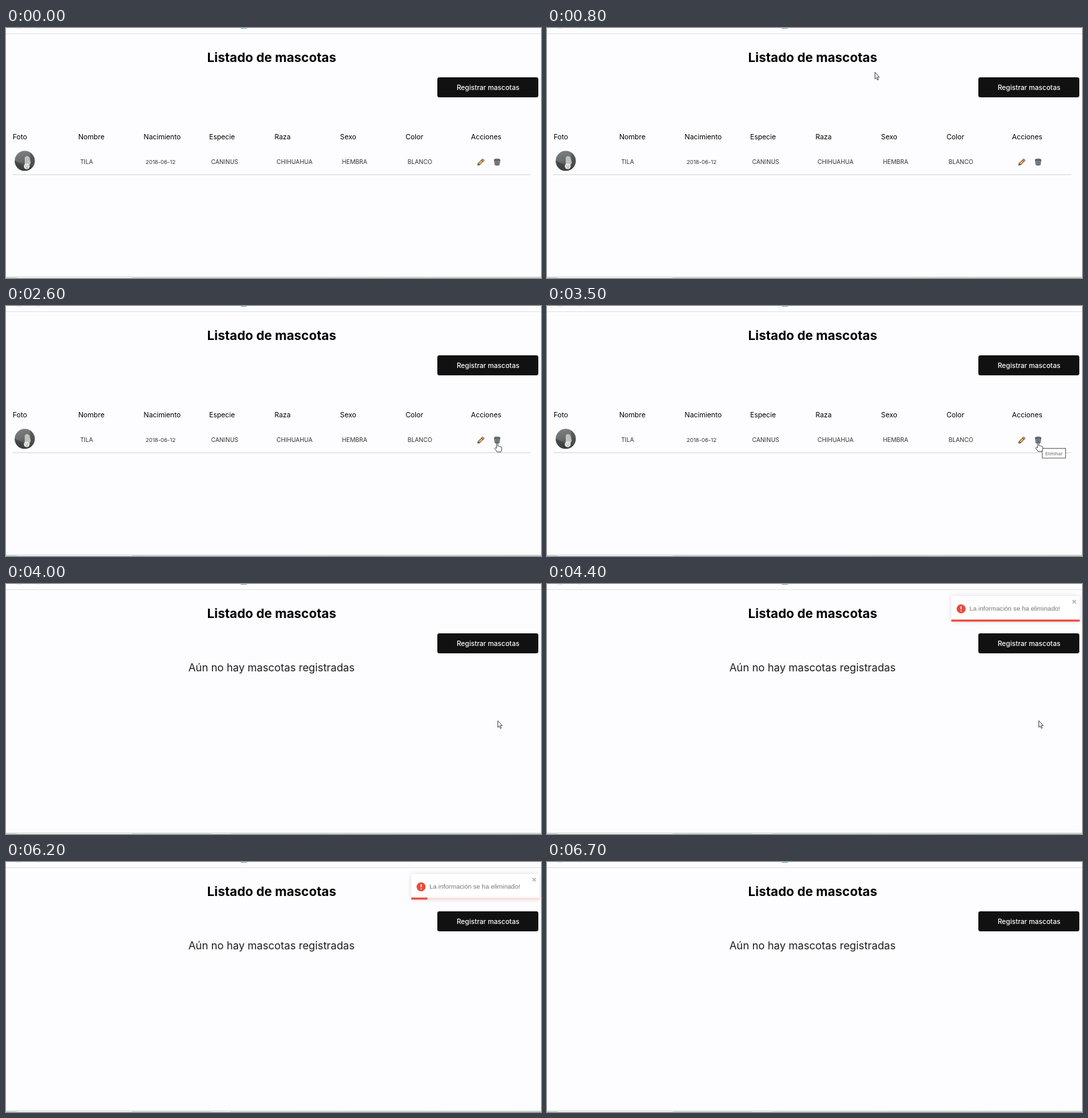
Animation of 800x375 px, one loop 7.1 s. Source, as an HTML page:

```html
<!DOCTYPE html>
<html lang="es">
<head>
<meta charset="utf-8">
<title>Listado de mascotas</title>
<style>
html, body { margin: 0; width: 100%; height: 100%; overflow: hidden; background: #fdfdff; }
svg { display: block; width: 100vw; height: 100vh; }
text { font-family: Inter, "Open Sans", sans-serif; fill: #000; }
.title { font-size: 19.2px; font-weight: 700; text-anchor: middle; }
.button { font-size: 10.2px; font-weight: 500; fill: #fff; text-anchor: middle; }
.head { font-size: 10.4px; font-weight: 400; }
.cell { font-size: 8.9px; fill: #333; }
.date { font-size: 8.2px; }
.empty { font-size: 15.8px; fill: #1c1c1c; text-anchor: middle; }
.message { font: 9.6px "Liberation Sans", Arial, sans-serif; fill: #757575; }
.tip { font: 6.9px "Open Sans", sans-serif; fill: #575757; }
.toast { filter: drop-shadow(0 .6px 3px rgba(0, 0, 0, .13)); }
.pointer { fill: #fff; stroke: #222; stroke-width: .8; stroke-linejoin: round; }
</style>
</head>
<body>
<svg viewBox="0 0 800 375">
  <defs>
    <clipPath id="avatar"><circle cx="28" cy="199.3" r="15"/></clipPath>
    <linearGradient id="photo" x1=".35" x2=".6" y2="1">
      <stop stop-color="#7c7f7f"/><stop offset=".45" stop-color="#6a6d6d"/><stop offset="1" stop-color="#2f3133"/>
    </linearGradient>
    <linearGradient id="strip">
      <stop stop-color="#c9e2d9"/><stop offset=".5" stop-color="#d5e4dc"/><stop offset="1" stop-color="#c8d6c4"/>
    </linearGradient>
  </defs>
  <rect width="800" height="375" fill="#fdfdff"/>

  <path d="M0 8.5H800" stroke="#dfe3e8"/>
  <path d="M351 .4H360" stroke="#69aee0" stroke-width="1.2"/>
  <path d="M16 .2H23M47 .2H50" stroke="#c9dcea" stroke-width=".8"/>
  <rect y="373" width="800" height="2" fill="url(#strip)"/>
  <path d="M0 373.5H800" stroke="#cdd4d0"/>
  <rect x="16" y="374" width="172" height="1" fill="#fff"/>
  <rect id="gap" x="307" y="374" width="29" height="1" fill="#f5f8f6"/>

  <text class="title" x="397.2" y="51.3">Listado de mascotas</text>
  <rect x="645" y="74" width="151" height="30" rx="3" fill="#111"/>
  <text class="button" x="720.8" y="92.7">Registrar mascotas</text>

  <g id="list">
    <g id="columns"></g>
    <g clip-path="url(#avatar)">
      <rect x="13" y="184" width="30" height="31" fill="url(#photo)"/>
      <path d="M13 199L27 206 26 215H13Z" fill="#3a3c3e" opacity=".7"/>
      <path d="M36 184L43 192V212L37 206Z" fill="#4a4d4e" opacity=".7"/>
      <path d="M28 194Q31 190 35 194L37 202Q36 206 33 207L28 205Z" fill="#bfc0bc"/>
      <ellipse cx="31" cy="207.5" rx="4.4" ry="4.2" fill="#e6e4df"/>
      <path d="M29.4 207H30.2M32.4 207H33.2M30.8 209.4H32" stroke="#4a4542"/>
    </g>
    <path d="M10 220H784" stroke="#d2d2d6"/>
    <g transform="translate(705.3 206) rotate(-45)" stroke="#3b3026" stroke-width=".8" stroke-linejoin="round">
      <path d="M.4 0L3-1.6H9.5V1.6H3Z" fill="#f6b44a"/>
      <path d="M.4 0L3-1.6V1.6Z" fill="#f1d6ad"/>
      <path d="M9.5-1.6H12.2V1.6H9.5Z" fill="#e8a092"/>
    </g>
    <g stroke="#33383c" stroke-width=".7">
      <path d="M730.2 198.2H738.6L737.6 205.3Q734.4 206.8 731.2 205.3Z" fill="#939ba1"/>
      <ellipse cx="734.4" cy="197.8" rx="4.5" ry="1.4" fill="#6b757c"/>
      <path d="M732.6 200.2L733 205M734.4 200.2V205.3M736.2 200.2L735.8 205" fill="none" stroke-width=".6"/>
    </g>
  </g>
  <text id="empty" class="empty" x="397" y="130.6">Aún no hay mascotas registradas</text>

  <g id="toast">
    <rect class="toast" x="606" y="18" width="192" height="38.4" rx="2.4" fill="#fff"/>
    <circle cx="620.7" cy="37.2" r="6.7" fill="#e74c3c"/>
    <path d="M620.7 33.4V37.9" stroke="#fff" stroke-width="1.6"/>
    <circle cx="620.7" cy="40.3" r=".9" fill="#fff"/>
    <text class="message" x="633.2" y="40.4">La información se ha eliminado!</text>
    <path d="M787.2 24L792.4 29.2M792.4 24L787.2 29.2" stroke="#a0a0a0" stroke-width="1.1"/>
    <rect x="606" y="53.4" width="192" height="3" rx="1" fill="#e74c3c" opacity=".18"/>
    <rect id="bar" x="606" y="53.4" width="192" height="3" fill="#e74c3c"/>
  </g>

  <g id="tip">
    <rect x="740.5" y="213.5" width="35" height="14.6" fill="#fff" stroke="#666"/>
    <text class="tip" x="744.9" y="223.6">Eliminar</text>
  </g>
  <path id="arrow" class="pointer" d="M.4 .4V10.4L2.6 8.4 4.1 12 5.6 11.4 4.1 7.8H7Z"/>
  <path id="hand" class="pointer" d="M-1.6 8V1.2Q-1.6 .2-.6 .2T.5 1.2V4.8Q1.6 4.1 2.4 5.1 3.6 4.6 4.2 5.6 6 5.2 6.2 7V9.4Q6.2 11.2 5 13.4H-.8Q-1.8 11.2-4 8.9-4.6 7.7-3.4 7.2-2.4 7.2-1.6 8Z"/>
</svg>
<script>
const LOOP = 7100, STEP = 100, DELETED = 3900;
const byId = id => document.getElementById(id);

const columns = [
  ["Foto"], ["Nombre", "TILA"], ["Nacimiento", "2018-06-12"], ["Especie", "CANINUS"],
  ["Raza", "CHIHUAHUA"], ["Sexo", "HEMBRA"], ["Color", "BLANCO"], ["Acciones"]
];

function addText(x, y, cls, value) {
  const el = document.createElementNS("http://www.w3.org/2000/svg", "text");
  el.setAttribute("x", x);
  el.setAttribute("y", y);
  el.setAttribute("class", cls);
  el.textContent = value;
  byId("columns").append(el);
}

columns.forEach(([head, value], i) => {
  const x = 10 + i * 97.9;
  addText(x, 167.2, "head", head);
  if (value) addText(x + 3, 204.2, i === 2 ? "cell date" : "cell", value);
});

// Pointer path: time, x, y
const path = [
  [0, 390, -30], [100, 405, -12], [400, 462, 38], [800, 490, 66],
  [1000, 508, 78], [1400, 656, 177], [1600, 599, 161], [1700, 679, 193],
  [1900, 701, 202], [2100, 724, 207], [2300, 735, 206], [2500, 735, 206],
  [2600, 735, 205.5], [2800, 735, 205.5], [2900, 735, 205], [4600, 735, 204.5],
  [4800, 716, 196], [5100, 664, 164], [5300, 643, 151], [5400, 637, 150],
  [5700, 545, 112], [6100, 327, 28], [6200, 290, -20]
];

// Toast entrance: progress, offset
const bounce = [[0, 1800], [.6, -15], [.75, 6], [.9, -3], [1, 0]];

const clamp = v => Math.min(1, Math.max(0, v));
const linear = p => p;
const easeOut = p => 1 - (1 - p) ** 2.2;

function sample(keys, t, ease = linear, col = 1) {
  const i = keys.findIndex(k => k[0] > t);
  if (i < 0) return keys[keys.length - 1][col];
  if (i === 0) return keys[0][col];
  const a = keys[i - 1], b = keys[i];
  return a[col] + (b[col] - a[col]) * ease((t - a[0]) / (b[0] - a[0]));
}

function show(id, on) {
  byId(id).style.display = on ? "" : "none";
}

function move(id, x, y) {
  byId(id).setAttribute("transform", `translate(${x} ${y})`);
}

function draw(t) {
  const deleted = t >= DELETED;
  show("list", !deleted);
  show("empty", deleted);
  show("gap", deleted);
  show("tip", t >= 3500 && !deleted);

  const x = sample(path, t), y = sample(path, t, linear, 2);
  const hover = !deleted && y > 195 && (x > 729 || (x > 704 && x < 717));
  const visible = t >= 100 && t < 6200;
  show("arrow", visible && !hover);
  show("hand", visible && hover);
  move("arrow", x, y);
  move("hand", x, y);

  const enter = sample(bounce, clamp((t - 3750) / 700), easeOut);
  const leave = 210 * clamp((t - 6500) / 200) ** 2;
  show("toast", deleted && t < 6700);
  move("toast", enter + leave, 0);
  byId("bar").setAttribute("width", 192 * (1 - clamp((t - 4450) / 2000)));
}

const start = performance.now();
function tick() {
  const t = (performance.now() - start) % LOOP;
  draw(Math.floor(t / STEP) * STEP);
  requestAnimationFrame(tick);
}
tick();
</script>
</body>
</html>
```
